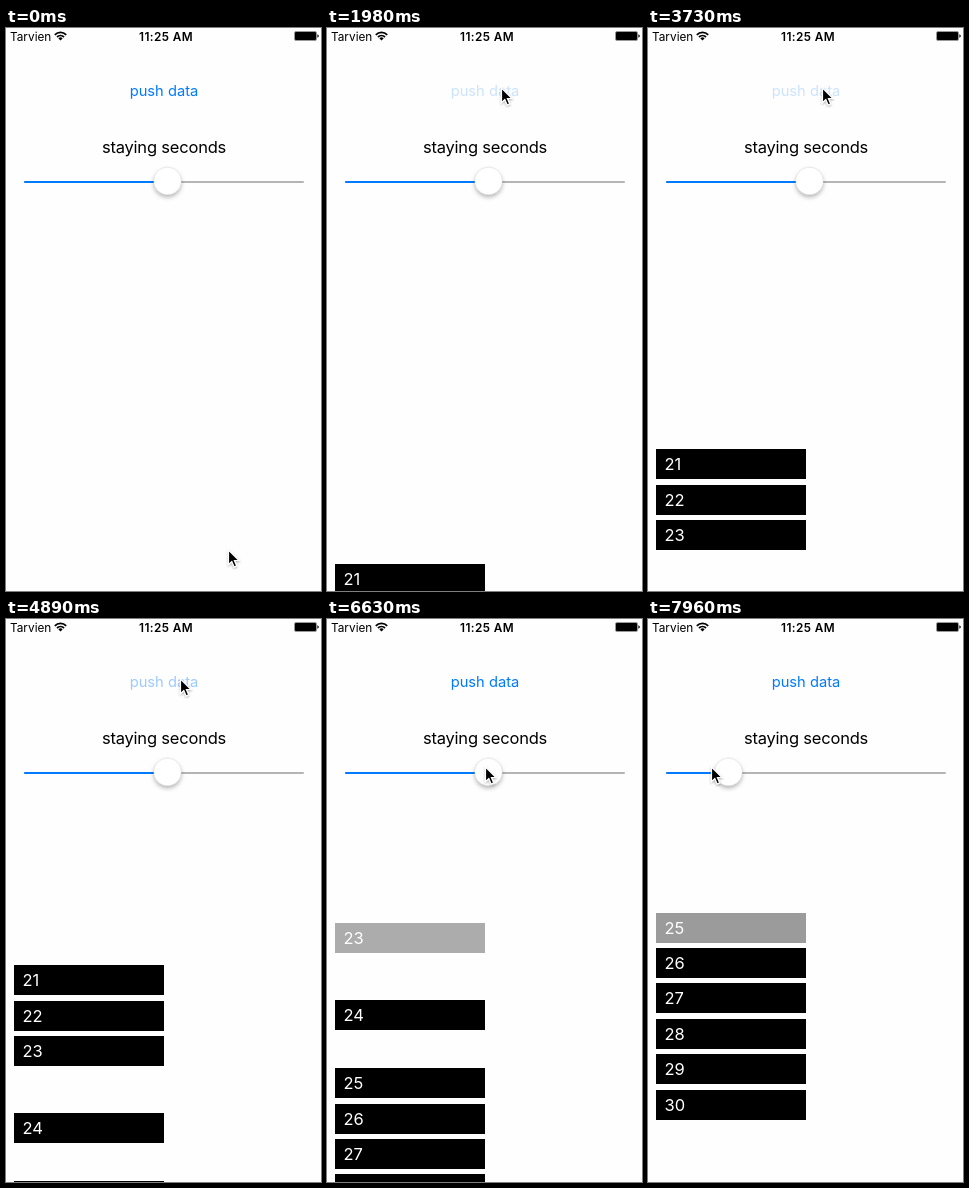
Animation of 315 by 563 pixels, one loop 8000 ms. Source, as an HTML page:

```html
<!DOCTYPE html>
<html lang="en">
<head>
<meta charset="utf-8">
<title>Push data</title>
<style>
  html, body { margin: 0; width: 100%; height: 100%; overflow: hidden; background: #fefefe; }
  svg { display: block; width: 315px; height: 563px; font-family: Inter, Roboto, sans-serif; }
  .status { font-size: 11.8px; }
  .label { font-size: 16.5px; letter-spacing: -.2px; text-anchor: middle; }
  .row { font-size: 16.5px; }
</style>
</head>
<body>
<svg viewBox="0 0 315 563">
  <defs>
    <filter id="soft" x="-50%" y="-50%" width="200%" height="200%">
      <feDropShadow dx="0" dy="2.5" stdDeviation="2" flood-opacity=".28"/>
    </filter>
    <filter id="small" x="-50%" y="-50%" width="200%" height="200%">
      <feDropShadow dx="0" dy="1" stdDeviation=".8" flood-opacity=".35"/>
    </filter>
  </defs>
  <rect width="315" height="563" fill="#fefefe"/>

  <g class="status">
    <text x="4" y="12.5">Tarvien</text>
    <text x="160" y="12.5" text-anchor="middle" font-weight="600" letter-spacing=".4">11:25 AM</text>
  </g>
  <g fill="none" stroke="#000" stroke-width="1.8">
    <path d="M48.8 6.8A8 8 0 0 1 60.2 6.8"/>
    <path d="M51 9A5 5 0 0 1 58 9"/>
    <path d="M54.5 12.6L52.4 10.4A3 3 0 0 1 56.6 10.4Z" fill="#000" stroke="none"/>
  </g>
  <rect x="288.5" y="3.5" width="22" height="9" rx="1.5" stroke="#999"/>
  <path d="M311.4 6.3Q312.8 6.8 312.8 8T311.4 9.7Z"/>

  <text id="button" x="158" y="68" fill="#007aff" font-size="14.7" text-anchor="middle">push data</text>
  <text class="label" x="158" y="125">staying seconds</text>

  <rect x="18" y="153" width="280" height="2" rx="1" fill="#b5b5b5"/>
  <rect id="fill" x="18" y="153" height="2" rx="1" fill="#007aff"/>
  <circle id="thumb" cy="153" r="13.8" fill="#fff" stroke="#000" stroke-opacity=".16" stroke-width=".5" filter="url(#soft)"/>

  <g id="rows" class="row"></g>

  <path id="cursor" d="M0 0V14.6L3.3 11.5L5.7 17L8.2 15.9L5.9 10.5H10.5Z"
    stroke="#fff" stroke-width="1.2" filter="url(#small)"/>
</svg>
<script>
const LOOP = 8000, STEP = 58, FIRST = 1580;
const BOTTOM = 563, PITCH = 35.4;
const HOLD = 100, ENTRY_LAG = 60, GLOW_MS = 300;
const FADE_TOP = 311.6, FADE_MS = 168;
const NS = 'http://www.w3.org/2000/svg';
const $ = id => document.getElementById(id);
const clamp = (v, lo, hi) => Math.min(hi, Math.max(lo, v));
const linear = p => p;
const smooth = p => p * p * (3 - 2 * p);

// Time and top of the first row; it speeds up when the slider drops
const scrollKeys = [[1586, BOTTOM], [3726, 421.2], [5930, 279.2], [7000, 208.5], [7500, 157.6], [7960, 77.8]];

// Time and pointer tip: up to the button, down to the slider, drag left
const cursorKeys = [
  [60, 222.5, 522], [700, 162, 5], [1200, 174.5, 60], [6230, 174.5, 60],
  [6450, 158.5, 148], [6930, 158.5, 148], [7500, 63.5, 148]
];

// Single taps, then a quick burst
const releases = [1526, 1800, 2050, 3762, 4816];
for (let i = 0; i < 5; i++) releases.push(5240 + 235 * i);

function along(keys, t, ease) {
  const last = keys[keys.length - 1];
  const time = clamp(t, keys[0][0], last[0]);
  const i = Math.max(1, keys.findIndex(k => k[0] >= time));
  const [t0, ...a] = keys[i - 1], [t1, ...b] = keys[i];
  const p = ease((time - t0) / (t1 - t0));
  return a.map((v, n) => v + (b[n] - v) * p);
}

const scrollTop = t => along(scrollKeys, t, linear)[0];

function add(parent, name, attrs) {
  const el = document.createElementNS(NS, name);
  for (const key in attrs) el.setAttribute(key, attrs[key]);
  return parent.appendChild(el);
}

// A row enters after its tap, or waits for room below the previous one
let next = 0;
const rows = releases.map((release, i) => {
  const offset = Math.max(next, BOTTOM - scrollTop(release + ENTRY_LAG));
  next = offset + PITCH;
  const g = add($('rows'), 'g', {});
  add(g, 'rect', { x: 8, width: 150, height: 30 });
  add(g, 'text', { x: 16.5, y: 21, fill: '#fff' }).textContent = 21 + i;
  return { g, offset };
});

function buttonAlpha(t) {
  const release = releases.filter(r => r - HOLD <= t).pop();
  return release ? .2 + .8 * clamp((t - release) / GLOW_MS, 0, 1) : 1;
}

function draw(time) {
  // The picture advances in even steps
  const t = Math.max(0, FIRST + STEP * Math.floor((time - FIRST + 8) / STEP));
  const top = scrollTop(t);
  const fadeLength = FADE_MS * (scrollTop(t - 1) - top);

  for (const { g, offset } of rows) {
    const y = top + offset;
    const alpha = y >= FADE_TOP ? 1 : Math.max(0, 1 - (FADE_TOP - y) / fadeLength);
    g.setAttribute('transform', `translate(0 ${Math.round(y)})`);
    g.setAttribute('opacity', alpha);
  }

  const [x, y] = along(cursorKeys, t, smooth);
  const thumb = Math.min(161.5, x + 17);
  $('cursor').setAttribute('transform', `translate(${x} ${y})`);
  $('thumb').setAttribute('cx', thumb);
  $('fill').setAttribute('width', thumb - 18);
  $('button').setAttribute('opacity', buttonAlpha(t));
}

const start = performance.now();
function tick() {
  draw((performance.now() - start) % LOOP);
  requestAnimationFrame(tick);
}
tick();
</script>
</body>
</html>
```
